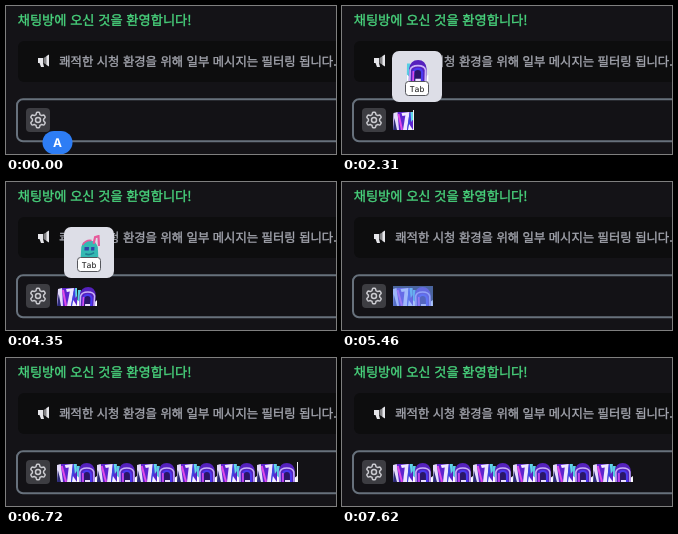
An HTML page that plays this animation: 330x148 px, repeating every 7650 ms.

```html
<!DOCTYPE html>
<html lang="ko">
<head>
<meta charset="utf-8">
<title>Chat emotes</title>
<style>
  html, body { margin: 0; width: 100%; height: 100%; overflow: hidden; background: #141317; }
  svg { display: block; width: 330px; height: 148px; }
  text { font-family: "Noto Sans CJK KR", "Noto Sans CJK", sans-serif; text-rendering: geometricPrecision; }
  .line { stroke-width: .35px; }
  #tab { font: 8px "DejaVu Sans Mono", monospace; }
  #badgeText { font: 700 12px Inter, "Noto Sans CJK KR", sans-serif; }
</style>
</head>
<body>
<svg id="stage" viewBox="0 0 330 148">
  <defs>
    <symbol id="slant" viewBox="0 0 20 20">
      <g class="sway">
        <path d="M0 4L5 2H20V20H0Z" fill="#5d24cf"/>
        <path d="M0 3L4 2L6 20H0Z" fill="#e4dcfb"/>
        <path d="M1 8L4 20H0Z" fill="#2c2a78"/>
        <path d="M5 4L9 20" stroke="#e04be6" stroke-width="2"/>
        <path d="M8 3L16 2L15 5L9 6Z" fill="#f2ecff"/>
        <path d="M12 5L16 3L14 20H10Z" fill="#eee6ff"/>
        <path d="M17 3L15 20" stroke="#3b45e0" stroke-width="2"/>
        <path d="M17 2H20V9L18 12Z" fill="#62d9e6"/>
        <path d="M16 14L20 20H15Z" fill="#f4efff"/>
      </g>
    </symbol>
    <symbol id="arch" viewBox="0 0 20 20">
      <g class="sway">
        <path d="M0 4H3V20H0Z" fill="#58cfe4"/>
        <path d="M0 20V14L4 17V20ZM20 20V14L16 17V20Z" fill="#fff"/>
        <path d="M2 20V9Q3 1 10 1T18 9V20Z" fill="#5521bd"/>
        <path d="M3 20V10Q4 6 10 6T17 10V20" fill="none" stroke="#c9b2f6" stroke-width="1.5"/>
        <path d="M5 20V12Q6 8 10 8T15 12V20Z" fill="#4a3af0"/>
        <path d="M7 20V13Q7 10 10 10T13 13V20Z" fill="#2a1669"/>
        <path d="M6 11V20" stroke="#dd4be6" stroke-width="1.5"/>
        <path d="M8 18H13V20H8Z" fill="#eadfff"/>
      </g>
    </symbol>
    <symbol id="horns" viewBox="0 0 20 20">
      <g class="sway">
        <path d="M1 20V8L4 3L8 6H13L17 2L20 8V20Z" fill="#5a1fd0"/>
        <path d="M1 9L4 3L8 6" fill="none" stroke="#35dff0" stroke-width="2"/>
        <path d="M12 5L17 2L19 9V15" fill="none" stroke="#f04bdc" stroke-width="2"/>
        <path d="M4 11L8 10V13L5 14ZM11 10L16 11L15 14L11 13Z" fill="#fff"/>
        <path d="M1 13L5 20H1Z" fill="#36c9f2"/>
        <path d="M6 17H15" stroke="#24104f" stroke-width="2"/>
      </g>
    </symbol>
    <symbol id="dome" viewBox="0 0 20 20">
      <g class="sway">
        <path d="M2 20V11Q3 5 9 5T17 11L18 20Z" fill="#35b9b2"/>
        <path d="M13 8L14 2L17 1L18 10" fill="none" stroke="#e75a9b" stroke-width="2"/>
        <path d="M3 9Q6 4 11 5" fill="none" stroke="#e75a9b" stroke-width="1.5"/>
        <path d="M5 11H9V14H5ZM11 11H14V14H11Z" fill="#3344a8"/>
        <path d="M6 17Q10 19 14 16" fill="none" stroke="#1f7f91" stroke-width="1.5"/>
      </g>
    </symbol>
  </defs>

  <rect width="330" height="148" fill="#141317"/>
  <text class="line" x="11.7" y="18.7" font-size="13.25" fill="#48d27c" stroke="#48d27c">채팅방에 오신 것을 환영합니다!</text>

  <rect x="12" y="35" width="330" height="41" rx="6" fill="#0d0d0e"/>
  <g fill="#e6e6ea">
    <path d="M32 52H37V57H32Z"/>
    <path d="M33.5 57H37L38 61H35Z"/>
    <path d="M37.5 52L41 50V59L37.5 57Z" opacity=".55"/>
    <path d="M40.5 50L43 48.5V60.5L40.5 59Z"/>
  </g>
  <text class="line" x="53.2" y="59.6" font-size="12.35" fill="#a3a5ae" stroke="#a3a5ae">쾌적한 시청 환경을 위해 일부 메시지는 필터링 됩니다.</text>

  <rect x="11" y="93.3" width="340" height="42" rx="6" fill="#131216" stroke="#67717c" stroke-width="2"/>
  <rect x="20" y="102" width="24" height="24" rx="4" fill="#3d3d42"/>
  <g fill="none" stroke="#cbcbd0" stroke-width="1.5" stroke-linejoin="round">
    <path id="gear"/>
    <circle cx="32" cy="114" r="2.5"/>
  </g>

  <g id="emotes"></g>
  <rect id="selection" x="51" y="104" width="40" height="20" fill="#6f9cf8" fill-opacity=".6"/>
  <text id="typed" y="119" font-size="13.4" fill="#efeff2"></text>
  <rect id="caret" y="104" width="1" height="20" fill="#f2f2f4"/>

  <g id="popup">
    <rect x="-25" y="45" width="50" height="51" rx="7" fill="#dddee7"/>
    <use id="preview" x="-10.5" y="53" width="22" height="22"/>
    <rect x="-11.5" y="75.5" width="23" height="14" rx="3" fill="#fff" stroke="#55565c"/>
    <text id="tab" y="85.5" text-anchor="middle" fill="#111">Tab</text>
  </g>

  <g id="badge">
    <rect x="-15" y="-11.5" width="30" height="23" rx="11.5" fill="#2d7df5"/>
    <text id="badgeText" y="4.5" text-anchor="middle" fill="#fff"></text>
  </g>
</svg>
<script>
  const LOOP = 7650, LEFT = 51, SIZE = 20, CHAR = 12.4, BLINK = 560;
  const $ = id => document.getElementById(id);
  const show = (el, on) => el.setAttribute('visibility', on ? 'visible' : 'hidden');
  const clamp = v => Math.max(0, Math.min(1, v));

  // Input contents: start time, emote count, typed text, selected
  const edits = [
    [220, 0, ''], [1080, 0, 'ㄷ'], [1320, 0, '두'], [1470, 0, '두ㄷ'],
    [1650, 0, '두두'], [1800, 0, '두둥'], [2310, 1, ''], [2400, 1, 'ㄷ'],
    [2550, 2, ''], [5160, 2, '', true], [5730, 2, ''], [5910, 4, ''],
    [6150, 6, ''], [6360, 8, ''], [6540, 10, ''], [6660, 12, '']
  ];
  // Popup: from, to, centre
  const popups = [[1110, 1320, 64], [1800, 2340, 75], [2460, 4980, 83]];

  // Poses by beat: h horns, s slant, a arch, d dome
  const poses = { h: 'horns', s: 'slant', a: 'arch', d: 'dome' };
  const tracks = { left: 'sssshhsss', right: 'aaaahhaaa', preview: 'aaddhhaaa' };

  const emotes = Array.from({ length: 12 }, (_, i) => {
    const use = document.createElementNS('http://www.w3.org/2000/svg', 'use');
    const box = { x: LEFT + i * SIZE, y: 104, width: SIZE, height: SIZE };
    for (const k in box) use.setAttribute(k, box[k]);
    return $('emotes').appendChild(use);
  });
  const swayers = document.querySelectorAll('.sway');

  // Six rounded teeth, one pointing up
  const rim = Array.from({ length: 72 }, (_, i) => {
    const a = i * Math.PI / 36;
    const r = 6.7 - 1.1 * Math.tanh(2.5 * Math.cos(6 * a));
    return (32 + r * Math.cos(a)).toFixed(2) + ' ' + (114 + r * Math.sin(a)).toFixed(2);
  });
  $('gear').setAttribute('d', 'M' + rim.join('L') + 'Z');

  function drawBadge(t) {
    const first = t < 700;
    const size = first ? 1 - clamp((t - 240) / 240)
      : Math.min(clamp((t - 930) / 120), 1 - clamp((t - 1170) / 150));
    show($('badge'), size > 0);
    $('badge').setAttribute('transform', `translate(51.5 136.5) scale(${0.5 + size / 2})`);
    $('badge').setAttribute('opacity', size);
    $('badgeText').textContent = first ? 'A' : '한';
  }

  function drawInput(t, pose) {
    const edit = edits.filter(e => e[0] <= t).pop();
    const [start, count, text, selected] = edit || [0, 0, ''];
    const textX = LEFT + count * SIZE;
    emotes.forEach((use, i) => {
      show(use, i < count);
      use.setAttribute('href', pose(i % 2 ? 'right' : 'left'));
    });
    $('typed').textContent = text;
    $('typed').setAttribute('x', textX);
    show($('selection'), selected);
    $('caret').setAttribute('x', Math.round(textX + text.length * CHAR));
    show($('caret'), edit && !selected && Math.floor((t - start) / BLINK) % 2 === 0);
  }

  function drawPopup(t, pose) {
    const popup = popups.find(p => t >= p[0] && t < p[1]);
    show($('popup'), popup);
    if (popup) $('popup').setAttribute('transform', `translate(${popup[2]} 0)`);
    $('preview').setAttribute('href', pose('preview'));
  }

  function render(now) {
    const t = Math.floor((now % LOOP) / 30) * 30;
    const beat = Math.floor(t / 90);
    const pose = name => '#' + poses[tracks[name][beat % tracks[name].length]];
    const lean = 4 * Math.sin(t / 900 * 2 * Math.PI);
    swayers.forEach(g => g.setAttribute('transform', `translate(0 20) skewX(${lean.toFixed(2)}) translate(0 -20)`));
    drawBadge(t);
    drawInput(t, pose);
    drawPopup(t, pose);
  }

  const begin = performance.now();
  function tick() {
    render(performance.now() - begin);
    requestAnimationFrame(tick);
  }
  tick();
</script>
</body>
</html>
```
